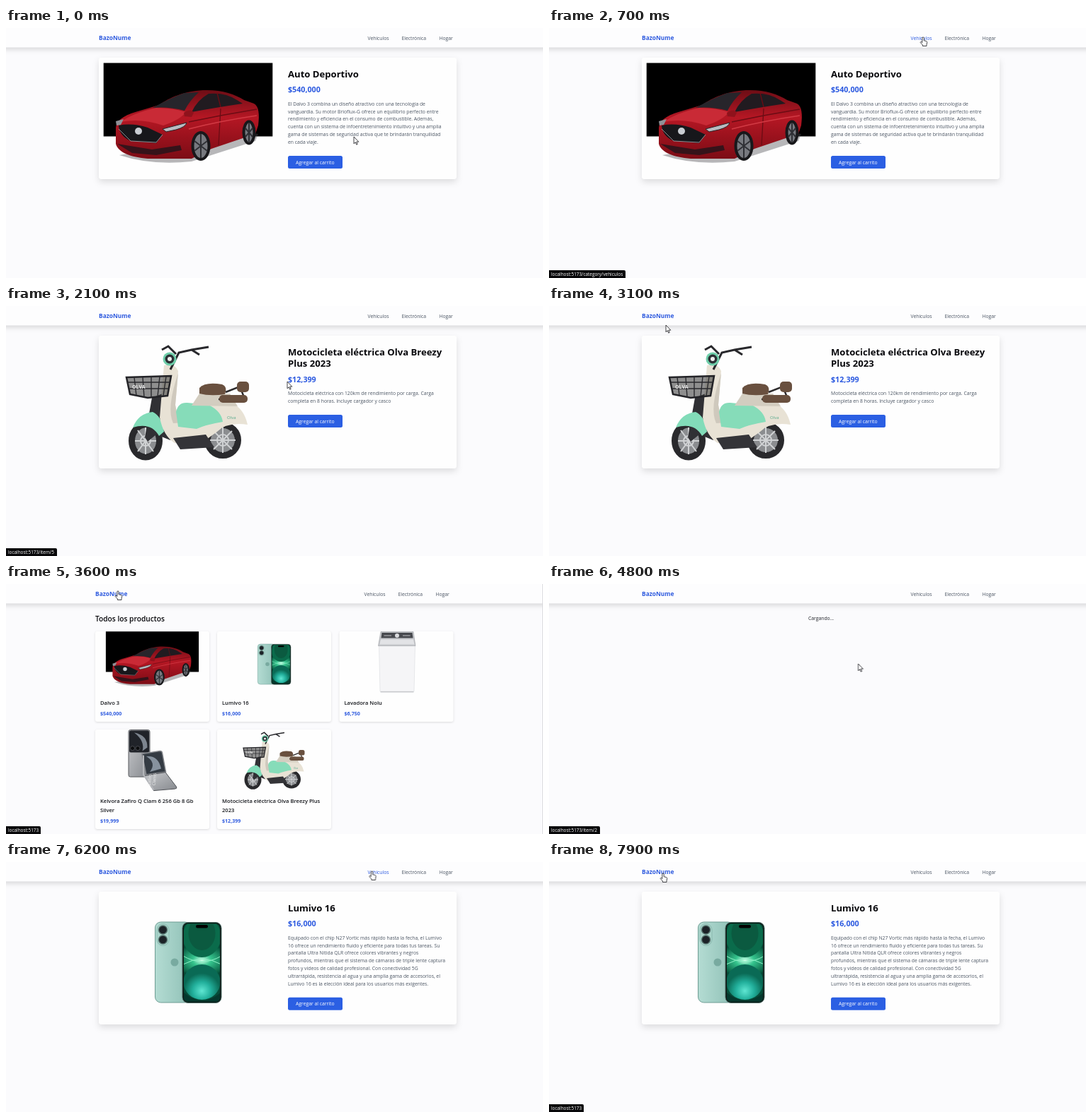
Write an HTML page that moves like this. It is 758x354 px and loops after 8000 ms.

```html
<!DOCTYPE html>
<html lang="es">
<head>
<meta charset="utf-8">
<title>BazoNume</title>
<style>
html, body { margin: 0; width: 100%; height: 100%; overflow: hidden; background: #fbfbfd; }
svg { display: block; width: 100vw; height: 100vh; }
text { font: 6.8px "Open Sans", "Noto Sans", sans-serif; fill: #4b5563; white-space: pre; }
.logo { font-size: 8.4px; font-weight: 700; fill: #2f5bdf; }
.heading { font-size: 10.2px; font-weight: 600; fill: #08080c; }
.title { font-size: 13.1px; font-weight: 700; fill: #08080c; }
.cost { font-size: 10.7px; font-weight: 700; fill: #2b59e0; }
.name { font-size: 7.6px; font-weight: 600; fill: #15171c; }
.price { font-size: 7.1px; font-weight: 700; fill: #2f5bdf; }
.button { fill: #fff; }
.dark { fill: #22242a; }
.bar { filter: drop-shadow(0 3px 3.5px rgba(0, 0, 0, .14)); }
.card { fill: #fefefe; filter: drop-shadow(0 1.8px 1.8px rgba(0, 0, 0, .13)); }
.panel { fill: #fefefe; filter: drop-shadow(0 4px 5px rgba(0, 0, 0, .12)); }
.status text { font-size: 6.4px; fill: #fff; }

/* One loop lasts 8 s, so 1.25% is one tick of 100 ms. */
.scene, .status { opacity: 0; animation: 8s step-end infinite; }
#carPage { animation-name: carPage; }
#category { animation-name: category; }
#loading { animation-name: loading; }
#scooterPage { animation-name: scooterPage; }
#home { animation-name: home; }
#phonePage { animation-name: phonePage; }
#toCategory { animation-name: toCategory; }
#toScooter { animation-name: toScooter; }
#toHome { animation-name: toHome; }
#toPhone { animation-name: toPhone; }
#menu { animation: shift 8s step-end infinite; }
#vehicles { animation: hover 8s step-end infinite; }
#cursor { --hand: 0; animation: travel 8s infinite, grab 8s step-end infinite; }
#hand { opacity: var(--hand); }
#arrow { opacity: calc(1 - var(--hand)); }

@keyframes carPage { 0% { opacity: 1 } 15% { opacity: 0 } }
@keyframes category { 15% { opacity: 1 } 25% { opacity: 0 } }
@keyframes loading { 25%, 60% { opacity: 1 } 26.25%, 61.25% { opacity: 0 } }
@keyframes scooterPage { 26.25% { opacity: 1 } 43.75% { opacity: 0 } }
@keyframes home { 43.75% { opacity: 1 } 60% { opacity: 0 } }
@keyframes phonePage { 61.25% { opacity: 1 } }
@keyframes toCategory { 8.75% { opacity: 1 } 20% { opacity: 0 } }
@keyframes toScooter { 20% { opacity: 1 } 30% { opacity: 0 } }
@keyframes toHome { 42.5%, 86.25% { opacity: 1 } 52.5% { opacity: 0 } }
@keyframes toPhone { 52.5% { opacity: 1 } 66.25% { opacity: 0 } }
@keyframes shift { 43.75% { transform: translateX(-5px) } 60% { transform: none } }
@keyframes hover { 7.5%, 72.5% { fill: #2b59e0 } 17.5%, 78.75% { fill: #4b5563 } }
@keyframes grab {
  7.5%, 20%, 31.25%, 40%, 51.25%, 72.5%, 86.25% { --hand: 1 }
  0%, 17.5%, 25%, 33.75%, 47.5%, 60%, 78.75% { --hand: 0 }
}
@keyframes travel {
  0% { transform: translate(491px, 154px); animation-timing-function: steps(7) }
  8.75%, 16.25% { transform: translate(528px, 13px); animation-timing-function: steps(4) }
  21.25%, 27.5% { transform: translate(397px, 107px); animation-timing-function: steps(3) }
  31.25% { transform: translate(452px, 160px); animation-timing-function: steps(6) }
  38.75% { transform: translate(165px, 27px); animation-timing-function: steps(3) }
  42.5%, 46.25% { transform: translate(158px, 10px); animation-timing-function: steps(4) }
  51.25% { transform: translate(530px, 112px); animation-timing-function: steps(4) }
  56.25%, 60% { transform: translate(436.5px, 113px); animation-timing-function: steps(8) }
  70% { transform: translate(528px, 60px); animation-timing-function: steps(3) }
  73.75% { transform: translate(522px, 14px); animation-timing-function: steps(3) }
  77.5% { transform: translate(516.5px, 13px); animation-timing-function: steps(3) }
  81.25% { transform: translate(193px, 62px); animation-timing-function: steps(5) }
  87.5%, 88.75% { transform: translate(160px, 18px); animation-timing-function: steps(1) }
  90%, 100% { transform: translate(161px, 16px) }
}
</style>
</head>
<body>
<svg viewBox="0 0 758 354" preserveAspectRatio="none">
  <defs>
    <linearGradient id="paint" x2="0" y2="1">
      <stop stop-color="#6d0d15"/><stop offset=".4" stop-color="#b51724"/><stop offset="1" stop-color="#7c0c15"/>
    </linearGradient>
    <linearGradient id="silver" x2="1" y2="1">
      <stop stop-color="#c9cbce"/><stop offset="1" stop-color="#85888d"/>
    </linearGradient>
    <linearGradient id="mint" x2="1"><stop stop-color="#b4dcd3"/><stop offset="1" stop-color="#8fc0b6"/></linearGradient>
    <radialGradient id="glow"><stop stop-color="#d4ffec"/><stop offset=".35" stop-color="#35c48d"/><stop offset="1" stop-color="#05563d"/></radialGradient>
    <radialGradient id="aqua" cy=".75"><stop stop-color="#5fe6d2"/><stop offset=".5" stop-color="#22b09c"/><stop offset="1" stop-color="#0a6a55"/></radialGradient>
    <clipPath id="screen"><rect x="251" y="87.500" width="51" height="110" rx="5.500"/></clipPath>

    <g id="car">
      <path d="M137.700 49.500H376.300V153.400H137.700Z"/>
      <path d="M160 180Q205 195 262 189L352 160 356 150 340 148Z" fill="#4b4b50" opacity=".4"/>
      <path d="M155 142C156 130 168 123 186 118L216 109C232 98 250 90 278 88C304 87 322 93 336 102L350 107C357 111 358 122 356 138L352 150 290 171 262 185 200 185C176 183 158 176 155 164Z" fill="url(#paint)"/>
      <path d="M162 133Q180 120 212 113Q236 113 254 119Q246 130 222 138Q190 127 162 133Z" fill="#c92a36"/>
      <path d="M207 113Q232 99 252 92L272 91Q259 103 252 117Q230 111 207 113Z" fill="#27252b"/>
      <path d="M262 119Q270 102 286 93Q310 91 326 102L334 107Q300 112 262 119Z" fill="#211b20"/>
      <path d="M298 92L303 112M258 133Q305 123 354 115M303 114L300 166" fill="none" stroke="#6b0c14" stroke-width="1.300"/>
      <path d="M258 143Q300 132 354 124" fill="none" stroke="#d23a44" stroke-width="1.500"/>
      <path d="M159 138Q178 134 200 141L221 151 212 163 176 160Q160 153 159 138Z" fill="#17171b"/>
      <path d="M159 143L176 160 212 162 221 151" fill="none" stroke="#a9abb1" stroke-width=".8"/>
      <path d="M221 143L255 134Q254 140 240 144L226 147Z" fill="#b9bcc2" stroke="#2a2226"/>
      <path d="M155 132L166 129 162 137 156 138Z" fill="#8f9298"/>
      <path d="M157 164L206 172 246 166 248 173 212 180 178 177Z" fill="#35131a"/>
      <circle cx="187" cy="146" r="5" fill="#c9ccd2"/>
      <path d="M251 120Q262 113 265 120L262 126 252 125Z" fill="#8f121c"/>
      <g fill="#77797f" stroke="#18181b" stroke-width="4">
        <ellipse cx="275" cy="167" rx="11.500" ry="19"/><ellipse cx="343" cy="148" rx="7.500" ry="15.500"/>
      </g>
      <path d="M275 150V184M266 160L284 174M284 160L266 174M343 135V161M338 142L348 154M348 142L338 154" stroke="#2f3035" stroke-width="2"/>
    </g>

    <g id="scooter">
      <g fill="#8b8d90" stroke="#29292c" stroke-width="9">
        <ellipse cx="197" cy="191" rx="19.500" ry="23"/><circle cx="306" cy="190" r="21.500"/>
      </g>
      <g fill="none" stroke="#d0d2d4" stroke-width="2">
        <path d="M197 172V210M182 191H212M186 176L208 206M208 176L186 206M306 172V208M288 190H324M293 177L319 203M319 177L293 203"/>
        <circle cx="197" cy="191" r="7"/><circle cx="306" cy="190" r="8"/>
      </g>
      <path d="M206 130L226 122 232 190 212 182 200 192 196 186Z" fill="#303034"/>
      <path d="M179 172Q187 152 207 150Q220 156 223 178L216 184Q205 164 179 172Z" fill="#82dcb9"/>
      <path d="M223 84Q238 80 243 92L239 140Q242 161 257 165Q258 146 275 135L318 137Q336 145 341 168Q312 164 298 178L276 194 238 194Q222 184 217 158Z" fill="#e8e2d5"/>
      <path d="M243 95L239 140Q241 158 251 165L236 166Q226 145 243 95Z" fill="#cfc9bd"/>
      <path d="M240 150Q243 136 256 137L286 140Q304 149 306 164Q282 168 269 174L243 171Z" fill="#86dcb9"/>
      <path d="M236 187L282 182 294 200 246 203Z" fill="#343438"/>
      <path d="M262 141L273 124H316L327 142Z" fill="#d3cdc0"/>
      <path d="M310 122L330 114 338 134 300 132" fill="none" stroke="#2d2b2c" stroke-width="2.500"/>
      <g fill="#69503f">
        <path d="M273 116Q281 107 305 111Q313 114 309 125Q288 128 273 124Z"/>
        <rect x="301" y="126" width="40" height="11" rx="5"/>
        <rect x="326" y="107" width="17" height="15" rx="5"/>
      </g>
      <path d="M232 90L244 66 262 62 286 58M240 68L229 57 220 62M262 62L273 69" fill="none" stroke="#28282c" stroke-width="3"/>
      <circle cx="231" cy="75" r="9.500" fill="#6fceaa"/><circle cx="231" cy="75" r="6.500" fill="#2b3034"/><circle cx="231" cy="75" r="3" fill="#eee"/>
      <path d="M170 101L233 99 228 127 200 130 175 125Z" fill="#333" fill-opacity=".55" stroke="#232327" stroke-width="2.500"/>
      <path d="M171 108H232M173 117H230M181 101L184 127M193 101L195 129M205 100V129M217 100L214 128M226 100L222 127" stroke="#29292d" stroke-width="1.400"/>
      <text x="178" y="117" style="font-size:7px;font-weight:700;fill:#eee">OLVA</text>
      <text x="312" y="160" style="font-size:6px;fill:#55a88c">Olva</text>
    </g>

    <g id="phone">
      <rect x="210.500" y="85" width="50" height="114" rx="8" fill="url(#mint)" stroke="#6f9d94"/>
      <rect x="213" y="87.500" width="17" height="31" rx="8.500" fill="#a9d4ca" stroke="#82b1a7" stroke-width=".8"/>
      <g fill="#1c2227" stroke="#55736e" stroke-width="1.500"><circle cx="221.500" cy="96" r="6"/><circle cx="221.500" cy="110" r="6"/></g>
      <circle cx="238" cy="142" r="5.500" fill="#78aaa0"/>
      <rect x="249" y="85.500" width="55" height="114" rx="8" fill="#0b1512" stroke="#4e7069"/>
      <g clip-path="url(#screen)">
        <path d="M250 86H304V200H250Z" fill="#064c38"/>
        <ellipse cx="276.500" cy="139" rx="37" ry="23" fill="url(#glow)"/>
        <ellipse cx="276.500" cy="106" rx="27" ry="29" fill="#0a6b4b"/>
        <ellipse cx="276.500" cy="101" rx="19" ry="24" fill="#0b5a40"/>
        <ellipse cx="276.500" cy="170" rx="26" ry="25" fill="url(#aqua)"/>
        <path d="M250 184Q277 208 304 184V200H250Z" fill="#05382d"/>
        <path d="M250 133Q277 149 304 133M250 145Q277 130 304 145" fill="none" stroke="#8df3c7"/>
      </g>
      <rect x="268" y="89" width="17" height="4.500" rx="2.200"/>
    </g>

    <g id="flip">
      <rect x="190" y="50" width="60" height="133" rx="5" fill="url(#silver)" stroke="#57595d" stroke-width="2"/>
      <rect x="192" y="52" width="56" height="62" rx="4" fill="#202329"/>
      <path d="M206 58Q244 65 243 100L229 110Q237 82 206 58Z" fill="#7d858f"/>
      <g fill="#0b0c0e" stroke="#7a7d82"><circle cx="201" cy="102" r="6"/><circle cx="216" cy="102" r="6"/></g>
      <path d="M228 118L279 110Q284 110 285 115L295 169 240 177Z" fill="#343b43" stroke="#808388" stroke-width="3"/>
      <path d="M240 125Q274 121 282 160L250 169Q270 143 240 125Z" fill="#87929e"/>
      <path d="M234 180L294 170 325 211Q328 216 321 217L261 222Z" fill="url(#silver)" stroke="#505358" stroke-width="2"/>
      <path d="M232 122V177L261 220" fill="none" stroke="#b4b6ba" stroke-width="4"/>
      <text transform="translate(252 208) rotate(-84)" style="font-size:12px;fill:#eee">Zafiro</text>
      <text transform="translate(265 208) rotate(-84)" style="font-size:12px;fill:#eee">Clam6</text>
    </g>

    <g id="washer">
      <path d="M208 86H310L307 219H211Z" fill="#f5f5f7" stroke="#d3d4d8"/>
      <path d="M213 50H305L311 90H206Z" fill="#c5c7cb" stroke="#8f9196"/>
      <path d="M216 53H302L304 68H214Z" fill="#47494e"/>
      <path d="M213 72H305L308 86H210Z" fill="#e2e3e6"/>
      <circle cx="259" cy="61" r="6" fill="#d9dadd"/>
      <path d="M222 61H243M275 61H296" stroke="#c0c1c5" stroke-width="2"/>
      <path d="M212 219H306V222H212Z" fill="#c8c9cd"/>
    </g>
  </defs>

  <path d="M0 0H758V354H0Z" fill="#fbfbfd"/>
  <path class="bar" d="M-9 -9H767V27.500H-9Z" fill="#fdfdfe"/>
  <g id="menu">
    <text class="logo" x="131" y="16.500">BazoNume</text>
    <text id="vehicles" x="510.500" y="16.500">Vehículos</text>
    <text x="558.500" y="16.500">Electrónica</text>
    <text x="611.500" y="16.500">Hogar</text>
  </g>
  <g id="pages"></g>
  <g id="cursor" stroke="#15151a" stroke-width=".8" stroke-linejoin="round" fill="#fff">
    <path id="arrow" d="M0 0V9.800L2.200 7.800 3.700 11.200 5.200 10.500 3.700 7.200H6.800Z"/>
    <path id="hand" d="M-1.200 1.200Q-1.200 0 0 0T1.200 1.200V4.800L4.300 5.500Q5.800 6 5.700 7.500L5 10.800V12.500H-.6V11L-3.800 7.500Q-3.400 6-2.200 6.700L-1.200 7.600Z"/>
  </g>
</svg>
<script>
const write = (x, y, rows, style = '', step = 0) => [].concat(rows)
  .map((row, i) => `<text class="${style}" x="${x}" y="${y + i * step}">${row}</text>`).join('');

const scene = (id, content) => `<g class="scene" id="${id}">${content}</g>`;

function detail(id, art, height, title, price, copy) {
  const extra = (title.length - 1) * 16.2;
  const top = 116.2 + extra + copy.length * 10.8;
  return scene(id, `<rect class="panel" x="131" y="42" width="505" height="${height}" rx="3.500"/>
    <use href="#${art}"/>
    ${write(398, 69.8, title, 'title', 16.2)}
    ${write(398, 91.4 + extra, price, 'cost')}
    ${write(398, 109.8 + extra, copy, '', 10.8)}
    <rect x="398" y="${top}" width="77" height="18" rx="2.500" fill="#2b5fe3"/>
    ${write(409, top + 11.6, 'Agregar al carrito', 'button')}`);
}

function card(x, y, height, art, name, price, scale = .5) {
  return `<rect class="card" x="${x}" y="${y}" width="161" height="${height}" rx="3"/>
    <use href="#${art}" transform="translate(${x + 80.5} ${y + .6}) scale(${scale}) translate(-257 -50)"/>
    ${write(x + 7, y + 104, name, 'name', 12.6)}
    ${write(x + 7, y + 106.4 + name.length * 12.6, price, 'price')}`;
}

const status = (id, width, address) => `<g class="status" id="${id}">
  <path d="M0 343H${width - 2}Q${width} 343 ${width} 345V354H0Z" fill="#08080a"/>
  ${write(3, 351, 'localhost:5173' + address)}</g>`;

const carCard = (x, height) => card(x, 67, height, 'car', ['Dalvo 3'], '$540,000', .55);
const scooterCard = (x, y) => card(x, y, 141, 'scooter',
  ['Motocicleta eléctrica Olva Breezy Plus', '2023'], '$12,399');

document.getElementById('pages').innerHTML = [
  detail('carPage', 'car', 172, ['Auto Deportivo'], '$540,000', [
    'El Dalvo 3 combina un diseño atractivo con una tecnología de',
    'vanguardia. Su motor Brioflux-G ofrece un equilibrio perfecto entre',
    'rendimiento y eficiencia en el consumo de combustible. Además,',
    'cuenta con un sistema de infoentretenimiento intuitivo y una amplia',
    'gama de sistemas de seguridad activa que te brindarán tranquilidad',
    'en cada viaje.']),
  scene('category', write(131, 53.3, 'Categoría: vehiculos', 'heading')
    + carCard(131, 141) + scooterCard(303, 67)),
  scene('loading', write(366, 50.5, 'Cargando...', 'dark')),
  detail('scooterPage', 'scooter', 188, ['Motocicleta eléctrica Olva Breezy', 'Plus 2023'], '$12,399', [
    'Motocicleta eléctrica con 120km de rendimiento por carga. Carga',
    'completa en 8 horas. Incluye cargador y casco']),
  scene('home', write(126, 53.3, 'Todos los productos', 'heading')
    + carCard(126, 128)
    + card(298, 67, 128, 'phone', ['Lumivo 16'], '$16,000')
    + card(470.5, 67, 128, 'washer', ['Lavadora Nolu'], '$6,750')
    + card(126, 206, 141, 'flip', ['Kelvora Zafiro Q Clam 6 256 Gb 8 Gb', 'Silver'], '$19,999')
    + scooterCard(298, 206)
    + '<path d="M757 0H758V354H757Z" fill="#dcdce0"/>'),
  detail('phonePage', 'phone', 188, ['Lumivo 16'], '$16,000', [
    'Equipado con el chip N27 Vortic más rápido hasta la fecha, el Lumivo',
    '16 ofrece un rendimiento fluido y eficiente para todas tus tareas. Su',
    'pantalla Ultra Nitida QLR ofrece colores vibrantes y negros',
    'profundos, mientras que el sistema de cámaras de triple lente captura',
    'fotos y videos de calidad profesional. Con conectividad 5G',
    'ultrarrápida, resistencia al agua y una amplia gama de accesorios, el',
    'Lumivo 16 es la elección ideal para los usuarios más exigentes.']),
  status('toCategory', 108, '/category/vehiculos'),
  status('toScooter', 72, '/item/5'),
  status('toHome', 49, ''),
  status('toPhone', 72, '/item/2')
].join('');
</script>
</body>
</html>
```
